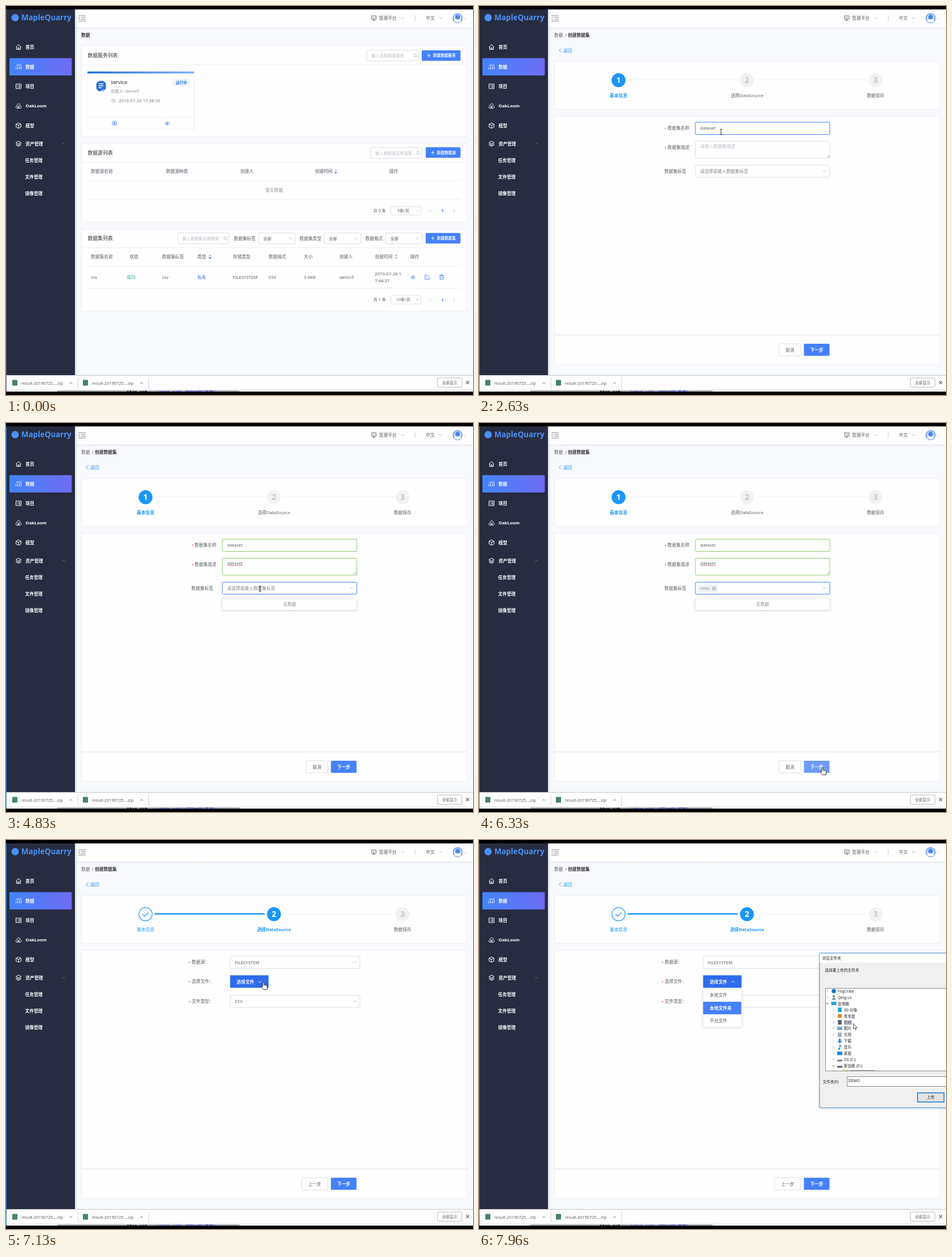
An HTML page for the animation above (8 s loop, 820x683 px).

```html
<!DOCTYPE html>
<html lang="zh-CN">
<head>
<meta charset="utf-8">
<title>数据</title>
<style>
  html, body { margin: 0; height: 100%; overflow: hidden; background: #000; }
  svg { display: block; width: 100vw; height: 100vh; font-family: "Noto Sans", "Noto Sans CJK SC", "Noto Sans CJK", sans-serif; }
</style>
</head>
<body>
<svg id="stage" viewBox="0 0 820 683"></svg>
<script>
const LOOP = 8000;
const BLUE = '#4581fb', HOVER = '#6d9bfb', DEEP = '#2e6cec', STEP = '#1a96fd', GREEN = '#8ccb6c';
const INK = '#5c5f66', DARK = '#303238', GREY = '#8f9299', PALE = '#b9bdc6', EDGE = '#dcdfe6', LINE = '#ebeef5', PAPER = '#fefefe';

// ---- drawing helpers: y of a text is the middle of its line
const txt = (x, y, s, fill = INK, size = 7.7, weight = 400, anchor = 'start') =>
  `<text x="${x}" y="${y + size * .37}" fill="${fill}" font-size="${size}" font-weight="${weight}" text-anchor="${anchor}">${s}</text>`;
const mid = (x, y, s, fill, size, weight) => txt(x, y, s, fill, size, weight, 'middle');
const box = (x0, y0, x1, y1, fill = PAPER, stroke = 'none', r = 0, extra = '') =>
  `<rect x="${x0}" y="${y0}" width="${x1 - x0}" height="${y1 - y0}" fill="${fill}" stroke="${stroke}" rx="${r}" ${extra}/>`;
const path = (d, stroke = INK, width = .9, fill = 'none') =>
  `<path d="${d}" stroke="${stroke}" stroke-width="${width}" fill="${fill}"/>`;
const dot = (x, y, r, fill = 'none', stroke = 'none', width = .9) =>
  `<circle cx="${x}" cy="${y}" r="${r}" fill="${fill}" stroke="${stroke}" stroke-width="${width}"/>`;
const at = (x, y, inner, scale = 1) => `<g transform="translate(${x} ${y}) scale(${scale})">${inner}</g>`;
const fade = (k, inner) => `<g opacity="${k}">${inner}</g>`;
const hline = (x0, x1, y, colour = LINE) => path(`M${x0} ${y}H${x1}`, colour, 1);
const turns = { up: 180, down: 0, left: 90, right: -90 };
const chevron = (x, y, dir = 'down', colour = PALE, r = 3) =>
  `<g transform="translate(${x} ${y}) rotate(${turns[dir]})">${path(`M${-r} ${-r / 2}L0 ${r / 2}L${r} ${-r / 2}`, colour)}</g>`;
const mix = (a, b, k) => `color-mix(in srgb, ${a}, ${b} ${(k * 100).toFixed(1)}%)`;
const clamp = k => Math.max(0, Math.min(1, k));
const ease = k => (k = clamp(k), k * k * (3 - 2 * k));

// ---- widgets
const card = (y0, y1) => box(132.5, y0 + .5, 809.5, y1 + .5, PAPER, LINE);
const field = (x0, y0, x1, y1, border = EDGE) => box(x0 + .5, y0 + .5, x1 - .5, y1 - .5, PAPER, border, 1.5);
const select = (x0, y0, x1, y1, label, size = 7.7) =>
  field(x0, y0, x1, y1) + txt(x0 + 8.7, (y0 + y1) / 2, label, INK, size) + chevron(x1 - 9.5, (y0 + y1) / 2);
const search = (x0, x1, y, hint) => field(x0, y - 10, x1, y + 10) + txt(x0 + 8.5, y, hint, PALE, 7.2)
  + dot(x1 - 7, y - .5, 2.5, 'none', PALE) + path(`M${x1 - 5} ${y + 1.5}l2 2`, PALE);
const addButton = (x0, y, label, fill = BLUE) => box(x0, y - 9.3, 798, y + 9.3, fill, 'none', 1.5)
  + path(`M${x0 + 9.5} ${y}h6M${x0 + 12.5} ${y - 3}v6`, '#fff') + txt(x0 + 19.7, y, label, '#fff', 6.65, 700);
const sorter = (x, y, active) =>
  path(`M${x - 2.8} ${y - 1}h5.6l-2.8-3z`, 'none', 0, '#b5bac4') + path(`M${x - 2.8} ${y + 1}h5.6l-2.8 3z`, 'none', 0, active ? BLUE : '#b5bac4');
const columns = (y, cells) => cells.map(([x, s]) => txt(x, y, s, GREY, 7.7, 600)).join('');
const pager = (y, total, size) => txt(645, y, `共 ${total} 条`, INK, 7.2) + field(675, y - 8, 729, y + 8)
  + mid(697.5, y, size, INK, 7.2) + chevron(722, y, 'down', PALE, 2.3) + chevron(745, y, 'left', PALE, 2.6)
  + mid(766.5, y, '1', BLUE, 7.7, 700) + chevron(787, y, 'right', PALE, 2.6);
const eye = (x, y) => path(`M${x - 4} ${y}q4-5.4 8 0q-4 5.4-8 0z`, BLUE) + dot(x, y, 1.3, BLUE);
const button = (x0, x1, label, fill, border, ink, weight) =>
  box(x0 + .5, 593, x1 - .5, 614.3, fill, border, 1.5) + mid((x0 + x1) / 2, 603.7, label, ink, 7.7, weight);

// ---- window frame, sidebar and header
const menuIcons = [
  'M-4.5 0L0-4.3L4.5 0M-3.4-1V4.3H3.4V-1M-1 4V1.2H1V4',
  'M-4.5 4.5V1M-1.5 4.5V-.5M1.5 4.5V0M4.5 4.5V-2M-4.5-1.5L-1.5-3.5L1-2L4.5-4.7',
  'M-4.5-4H4.5V4H-4.5ZM-2.5-1.7H-1.5M0-1.7H3M-2.5 0H-1.5M0 0H3M-2.5 1.8H-1.5M0 1.8H3',
  'M-2.8 4C-5.8 3.5-5 0-2.7-.4C-2.4-5 3-5 2.9-.4C5.4 0 5.4 4 2.8 4ZM-2 2.2L0-.4L2 2.2Z',
  'M0-4.6L4.3-2.5V2.6L0 4.7L-4.3 2.6V-2.5ZM-4.3-2.5L0-.3L4.3-2.5M0-.3V4.7',
  'M0-4.5L4.6-2L0 .5L-4.6-2ZM-4.6 .2L0 2.7L4.6 .2M-4.6 2.2L0 4.7L4.6 2.2'];
const menu = [['首页', 72], ['数据', 106.7], ['项目', 141], ['OakLoom', 175.5], ['模型', 210], ['资产管理', 241.8]];
const download = x => box(x, 656.5, x + 9, 666.5, '#48826a', 'none', 1)
  + txt(x + 16, 662.3, 'result-20190725....zip', INK, 7.3) + chevron(x + 103, 662, 'up', '#63666d', 2.4);

const frame = box(0, 0, 820, 683, '#000') + box(0, 6, 820, 677, '#fff') + box(121, 38, 820, 648, '#f8f9fc')
  + box(121, 6, 820, 38, PAPER) + box(121, 38, 820, 41, 'url(#under)') + box(121, 6, 125, 648, 'url(#side)')
  + box(0, 6, 121, 648, '#272c40')
  + dot(16, 20.5, 6.5, '#4a90f5') + txt(27, 20.5, 'MapleQuarry', '#4a90f5', 13.3, 800)
  + box(6, 91.5, 115.5, 122, 'url(#active)', 'none', 1.5)
  + menu.map(([s, y], i) => at(22, y, path(menuIcons[i], '#fff', 1)) + txt(34.3, y, s, '#fff', 7.7, 700)).join('')
  + chevron(101, 242, 'up', '#737889', 2.6)
  + ['任务管理', '文件管理', '镜像管理'].map((s, i) => txt(33.5, 270.7 + 29 * i, s, '#fff', 7.7, 700)).join('')
  + path('M127 17H140M132 20H140M132 23.2H140M127 26.3H140M130 19.4L127.3 21.6L130 23.8', '#85888f', 1)
  + at(646, 21, path('M-4-3.8H4V2H-4ZM0 2V4M-2.5 4.2H2.5M-2 0L-.5-1.5L.7-.3L2.3-2', INK))
  + txt(655, 21.5, '管理平台') + chevron(696.5, 21.5) + path('M718.5 16V27', '#ccd0d8', 1)
  + txt(737.3, 21.5, '中文') + chevron(763, 21.5)
  + dot(793, 21.3, 8, '#c9dcfb', '#4b83ea', 1.2) + path('M787 27Q787 23 793 23T799 27Q793 31 787 27Z', 'none', 0, '#fff')
  + dot(793, 19.5, 4, '#4b83ea') + chevron(806, 22.5, 'down', PALE, 1.3)
  + box(0, 648, 820, 675, PAPER) + hline(0, 820, 648.5, '#c4c7cc')
  + download(11) + download(135) + path('M126.5 652V672M250.5 652V672', '#d6d8dc', 1)
  + box(757.5, 653, 800.5, 669.5, PAPER, '#b9bcc2', 2) + mid(779, 661.5, '全部显示', INK, 6.65)
  + path('M807.8 658.5l5.4 5.4m0-5.4l-5.4 5.4', INK, 1.1) + hline(0, 820, 674.6, '#cfd1d5')
  + `<g clip-path="url(#strip)" font-family="'Noto Sans Mono', monospace">${box(90, 675, 410, 677, '#b9bbc0')}${txt(140, 677.5, '- - - -', '#334')}${
      txt(212, 677, 'item_set', '#111', 7.5, 700)}${txt(265, 677, "'item_set' 读取示例(本地)", '#22b', 7.5)}</g>`;

// ---- list page
const home = hover => txt(132, 50.7, '数据', DARK, 7.7, 700)
  + card(69, 229) + hline(132, 809, 103.5) + txt(143.5, 87, '数据服务列表', DARK, 8.8)
  + search(633, 725, 87, '输入名称搜索服务') + addButton(730, 87, '新建数据服务')
  + box(143.5, 115.5, 330, 216.5, PAPER, LINE) + box(143, 115, 330, 118.5, 'url(#bar)') + hline(144, 330, 195.5)
  + box(158.5, 131.5, 175.5, 150, '#2573d8', 'none', 7) + path('M162.5 136.5H171M162.5 140H171M162.5 143.5H168', '#fff', 1.3)
  + path('M166 150.5Q171 146 176.5 148', '#fff', 1.3)
  + txt(184, 133.5, 'service', DARK, 8.9) + box(292, 127, 323.5, 141, '#edf3fd', 'none', 7) + txt(298, 134.2, '运行中', '#2573d8', 6.65, 600)
  + txt(184, 149.3, '创建人: demo5', GREY, 7.3) + dot(188.5, 166.3, 2.8, 'none', GREY, .7) + path('M188.5 164.7V166.5H190', GREY, .7)
  + txt(198, 165.8, '2019-07-26 17:38:36', '#777a81')
  + dot(190.3, 206, 4, 'none', BLUE) + box(188.8, 204.5, 191.8, 207.5, BLUE) + eye(283, 206.2)

  + card(241, 379) + hline(132, 809, 274.5) + txt(143.5, 258, '数据源列表', DARK, 8.8)
  + search(640, 731, 258, '输入数据源名称搜索') + addButton(737, 257.3, '新建数据源')
  + columns(290.3, [[149, '数据源名称'], [281, '数据源种类'], [411.5, '创建人'], [542.5, '创建时间'], [673, '操作']]) + sorter(579, 290.5, true)
  + hline(143, 798, 306.5) + mid(471, 323.5, '暂无数据', GREY) + hline(143, 798, 339.5) + pager(359.5, 0, '5条/页')

  + card(391, 535) + hline(132, 809, 424.5) + txt(143.5, 408, '数据集列表', DARK, 8.8) + search(301, 392, 408, '输入数据集名称搜索')
  + [[400, 443, '数据集标签'], [515.5, 558, '数据集类型'], [631, 666, '数据格式']]
      .map(([x, sx, s]) => txt(x, 408, s) + select(sx, 398, sx + 65.5, 418, '全部', 7.2)).join('')
  + addButton(737, 407.7, '新建数据集', hover ? HOVER : BLUE)
  + columns(440, [[149, '数据集名称'], [217, '状态'], [274, '数据集标签'], [336, '类型'], [398.5, '存储类型'],
      [461, '数据格式'], [523, '大小'], [585.5, '创建人'], [648, '创建时间'], [710, '操作']])
  + sorter(358.3, 440.3, true) + sorter(685, 440.3) + hline(143, 798, 456.5)
  + [[149, 'iris'], [212, '成功', '#1fb89c'], [274, 'csv'], [336, '私有', '#4a6ff5'], [398.5, 'FILESYSTEM'], [461, 'CSV'], [523, '3.0KB'], [585.5, 'demo5']]
      .map(([x, s, c]) => txt(x, 476, s, c)).join('')
  + txt(647.5, 469.7, '2019-07-26 1') + txt(647.5, 482.3, '7:44:37') + eye(714.5, 476.3)
  + path('M740 472.5H735.8V480H743.3V476M738 477.7L743.8 471.8', BLUE)
  + path('M761 473.5H769M762 473.5V480H768V473.5M763.5 473V471.8H766.5V473M764 475.5V478M766 475.5V478', BLUE)
  + hline(143, 798, 495.5) + pager(515.7, 1, '10条/页');

// ---- wizard
const star = (x, y) => txt(x, y + 1, '*', '#f56c6c');
const stepper = (shown, next) => {
  const idle = mix('#ebf2fc', '#f2f2f4', shown), idleInk = mix('#dde6f3', '#c3c6cd', shown);
  const digit = (x, n, fill, ink) => dot(x, 130.3, 12.2, fill) + mid(x, 130.2, n, ink, 14, 700);
  return hline(261, 454, 129.7, '#eaedf2') + hline(487, 680, 129.7, '#eaedf2')
    + (shown < 1 ? dot(262, 129, 1, '#8fc0f5') : '')
    + (next ? path(`M261 129.7h${193 * next}`, STEP, 2.6) : '')
    + (next ? dot(245, 130.3, 11.6, PAPER, STEP, 1.2) + path('M240 130.5L243.6 134L250.3 126.8', STEP, 1.2)
            : digit(245, 1, mix('#ebf2fc', STEP, shown), '#fff'))
    + digit(470.5, 2, mix(idle, STEP, next), mix(idleInk, '#fff', next)) + digit(696.3, 3, idle, idleInk)
    + mid(245, 157, '基本信息', STEP, 7.7, next ? 400 : 700)
    + mid(470.7, 157, '选择DataSource', next ? STEP : INK, 7.7, next ? 600 : 400) + mid(696.3, 157, '数据保存');
};
const wizard = (shown, next) => txt(132, 50.7, '数据') + txt(151, 50.7, '/') + txt(156, 50.7, '创建数据集', DARK, 7.7, 700)
  + chevron(142.5, 78, 'left', BLUE, 3.5) + txt(148, 77.7, '返回', STEP)
  + card(97, 181) + stepper(shown, next) + card(193, 629) + hline(132, 809, 577.5, '#dfe2e8');

const typed = (word, times, t) => word.slice(0, times.filter(k => t >= k).length);
const border = (t, focus, blur) => t < focus ? EDGE : t < blur ? BLUE : GREEN;

function basicForm(t) {
  const name = typed('dataset', [1530, 1630, 1800, 1860, 2000, 2120, 2230], t);
  const note = typed('dataset', [3230, 3330, 3600, 3660, 3800, 3900, 4000], t);
  const tag = typed('other', [5030, 5260, 5340, 5420, 5500], t);
  const open = ease((t - 4600) / 170) * (1 - ease((t - 6450) / 150)), done = t >= 5700, option = tag && !done;
  const noteWidth = note.length * 3.85;
  let s = star(325.5, 214.5) + txt(331, 214.5, '数据集名称') + field(379.5, 203.5, 616.5, 226, border(t, 1430, 2900))
    + txt(388.5, 214.5, name || '请输入数据集名称', name ? INK : PALE)
    + star(325.5, 248.5) + txt(331, 248.5, '数据集描述') + field(379.5, 237, 616.5, 267.5, border(t, 2950, 4560))
    + txt(388.5, 246.3, note || '请输入数据集描述', note ? INK : PALE)
    + (note ? path(`M389 250.4h${noteWidth}`, '#e0565b', .8) : '') + path('M611 265.5l4-4M613.5 265.5l1.5-1.5', '#777', .7)
    + txt(325.5, 290, '数据集标签') + field(379.5, 279, 616.5, 301, open > 0 ? BLUE : EDGE)
    + chevron(606.5, 290, open > .5 ? 'up' : 'down');
  if (done) s += box(384, 284, 419, 296.7, '#f0f2f5', 'none', 1.5) + txt(388.3, 290.3, 'other', GREY, 6.7)
    + dot(412.7, 290.5, 3.7, '#c0c4cc') + path('M411.3 289.1l2.8 2.8m0-2.8l-2.8 2.8', '#fff', .8);
  else s += txt(388, 290, tag || '请选择或输入数据集标签', tag ? INK : '#85888f');
  if (open > 0) s += fade(open, box(380, 308, 616, option ? 333.5 : 328.5, PAPER, '#e4e7ed', 1.5, 'filter="url(#soft)"')
    + path('M399 308.5l3.5-3.3l3.5 3.3', '#e4e7ed', .8, PAPER)
    + (option ? box(380.5, 311.3, 615.5, 330, '#f5f7fa') + txt(391, 320.7, tag) : mid(498, 318.3, '无数据', GREY)));
  return s + button(526.5, 565.5, '取消', PAPER, EDGE, INK) + button(570, 616, '下一步', mix(BLUE, HOVER, ease((t - 6230) / 80)), 'none', '#fff', 700);
}

function sourceForm(t) {
  const open = ease((t - 7190) / 150), picked = t >= 7430;
  let s = [['数据源：', 214.5], ['选择文件：', 248.5], ['文件类型：', 283]].map(([l, y]) => star(320, y) + txt(326, y, l)).join('')
    + select(393, 203.5, 622, 226, 'FILESYSTEM') + select(393, 272, 622, 294.5, 'CSV')
    + box(393.5, 237.5, 461, 259.5, t >= 7060 ? DEEP : BLUE, 'none', 1) + txt(405, 248.7, '选择文件', '#fff', 7.7, 700)
    + chevron(446, 249, open > .5 ? 'up' : 'down', '#fff');
  if (open > 0) s += fade(open, box(393.5, 262, 461, 328, PAPER, LINE, 1, 'filter="url(#soft)"')
    + (picked ? box(393.5, 284, 460.5, 306, BLUE) : '')
    + txt(405, 272.3, '本地文件') + txt(405, 295, '本地文件夹', picked ? '#fff' : INK, 7.7, picked ? 700 : 400) + txt(405, 317, '平台文件'));
  return s + button(518.5, 565.5, '上一步', PAPER, EDGE, INK) + button(570, 616, '下一步', BLUE, 'none', '#fff', 700);
}

// ---- folder dialog
const folders = [['FogCrate', 0, '#1677d2', 'round'], ['Qing Lo', 0, '#6f8f86', 'person'], ['此电脑', 0, '#2ba3e0', 'wide'],
  ['3D 对象', 1, '#26a5c9'], ['青禾盘', 1, '#d98b2b', 'round'], ['视频', 1, '#5b6068'], ['图片', 1, '#7aa7c7', 'wide'], ['文档', 1, '#9db4c4'],
  ['下载', 1, '#2f86d8', 'arrow'], ['音乐', 1, '#2f86d8', 'note'], ['桌面', 1, '#1688d6', 'wide'], ['OS (C:)', 1, '#7b8087', 'drive'], ['新加卷 (D:)', 1, '#55595f', 'drive']];
const glyph = {
  round: c => dot(0, 0, 3.8, c), wide: c => box(-4.5, -3.2, 4.5, 2.8, c), drive: c => box(-4.5, 0, 4.5, 3, c),
  person: c => dot(0, -2, 2, c) + path('M-3.5 4Q0-3 3.5 4Z', c, .5, c),
  arrow: c => path('M-1.5-4H1.5V0H4L0 4L-4 0H-1.5Z', c, .3, c), note: c => path('M0 2.5V-4Q3-2 2.5 0', c, 1.2) + dot(-1.2, 2.6, 1.7, c)
};
const tree = folders.map(([s, depth, c, kind], i) => {
  const y = 265.3 + 10.95 * i, x = 612 + 10.5 * depth, open = i === 2 || i === 12;
  return chevron(x, y, open ? 'down' : 'right', open ? '#444' : '#a5a8ad', 2.1)
    + at(x + 11, y, kind ? glyph[kind](c) : box(-3.3, -4, 3.3, 4, c))
    + (i === 5 ? box(x + 17.5, y - 5, x + 33.5, y + 5, '#e5eaf8') : '') + txt(x + 18, y, s, '#222', 6.7);
}).join('');
const dialog = box(598, 198.5, 830, 470, '#f0f0f0', '#3c8fd6', 1, 'filter="url(#soft)"') + box(598.5, 199, 820, 215.5, '#fff')
  + txt(602.5, 207.3, '浏览文件夹', '#222', 6.65) + txt(607.5, 228.3, '选择要上传的文件夹', '#222', 6.65)
  + box(608.5, 260.5, 830, 405.5, '#fff', '#868b93') + tree + box(640, 403.5, 648, 405, '#f2cf63') + path('M652 404.6H695', '#777', .8, 'none')
  + txt(603.5, 425, '文件夹(F):', '#222', 6.65) + box(646.5, 415.5, 830, 432.5, '#fff', '#868b93') + txt(648.5, 422, 'DEMO', '#222', 6.9)
  + box(770, 444, 816.5, 460, '#e1e1e1', '#1c7fd4', 0, 'stroke-width="1.6"') + mid(793, 452, '上传', '#222', 6.65);

// ---- pointer: time, x, y of the hot spot, shape
const route = [
  [100, 781, 449, 'arrow'], [200, 777, 420, 'arrow'], [400, 777, 420, 'arrow'], [440, 777, 411, 'hand'], [960, 777, 411, 'arrow'],
  [1350, 425, 221, 'beam'], [2650, 425, 221, 'beam'], [2900, 432, 252, 'beam'], [4260, 432, 252, 'beam'], [4500, 446, 291, 'beam'],
  [5960, 446, 291, 'arrow'], [6230, 603, 605, 'hand'], [6760, 603, 605, 'arrow'], [7060, 452, 250, 'hand'], [7290, 452, 250, 'hand'],
  [7460, 432, 292, 'hand'], [7720, 432, 292, 'arrow'], [7960, 657.5, 322.5, 'arrow']];
const shapes = {
  arrow: path('M0 0V11.5L2.7 9L4.6 13.2L6.2 12.5L4.3 8.4H8Z', '#222', .9, '#fff'),
  hand: path('M-1.2 .9C-1.2-.4 1.1-.4 1.1.9V4.6Q3 4 3.4 5Q5.2 4.7 5.4 5.8Q7 5.7 6.9 7.2L6.2 12.8H.2L-3.4 8.6C-4.2 7.2-2.6 6.4-1.2 7.8Z', '#222', .9, '#fff'),
  beam: path('M-2-4.7H-.5L0-4.2L.5-4.7H2M-2 4.7H-.5L0 4.2L.5 4.7H2M0-4.2V4.2', '#222', 1)
};
function pointer(t) {
  const i = route.findLastIndex(k => t >= k[0]);
  if (i < 0) return '';
  const [t0, x0, y0, shape] = route[i], [t1, x1, y1] = route[i + 1] || [t0 + 1, x0, y0];
  const k = ease((t - t0) / (t1 - t0));
  return at(x0 + (x1 - x0) * k, y0 + (y1 - y0) * k, shapes[shape], shape === 'arrow' ? .82 : 1);
}

const gradient = (id, from, to, dir = 'x2="1"') =>
  `<linearGradient id="${id}" x1="0" y1="0" ${dir === 'x2="1"' ? 'x2="1" y2="0"' : 'x2="0" y2="1"'}><stop stop-color="${from}"/><stop offset="1" stop-color="${to}"/></linearGradient>`;
const defs = '<defs>' + gradient('active', '#4384ff', '#6e6cf3') + gradient('bar', '#2870d2', '#82b2f6')
  + gradient('under', '#e3e6ee', '#f8f9fc', 'down') + gradient('side', '#d4d8e3', '#d4d8e300')
  + '<clipPath id="strip"><rect y="675" width="820" height="3"/></clipPath>'
  + '<filter id="soft"><feDropShadow dx="0" dy="1" stdDeviation="2" flood-color="#000" flood-opacity=".16"/></filter></defs>';

function scene(t) {
  const active = t >= 790 && t < 7720;
  let page;
  if (t < 790) page = home(t >= 430);
  else {
    const shown = clamp((t - 780) / 250), next = ease((t - 6560) / 300);
    page = wizard(shown, next) + (t < 6560 ? basicForm(t) : sourceForm(t));
  }
  return page + (t >= 7720 ? dialog : '') + box(0, 6, 1, 677, active ? '#2a86dd' : '#5d626e') + pointer(t);
}

const stage = document.getElementById('stage');
stage.innerHTML = defs + `<g>${frame}</g><g id="live"></g>`;
const live = document.getElementById('live');
const start = performance.now();
let last = '';
function tick() {
  const markup = scene((performance.now() - start) % LOOP);
  if (markup !== last) live.innerHTML = last = markup;
  requestAnimationFrame(tick);
}
tick();
</script>
</body>
</html>
```
